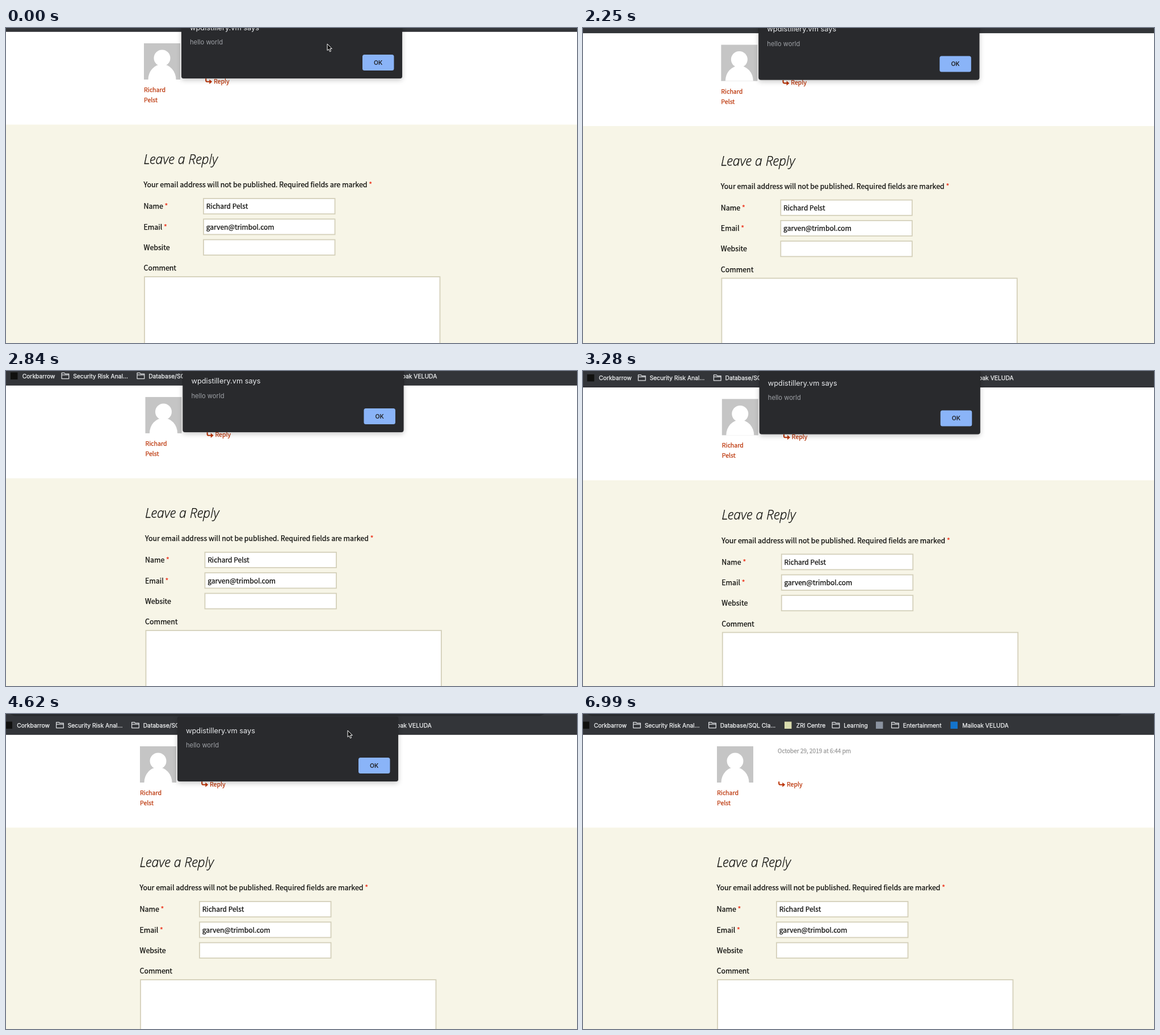
An HTML page that plays this animation: 1006 by 556 pixels, repeating every 8.19 s.

```html
<!DOCTYPE html>
<html lang="en">
<head>
<meta charset="utf-8">
<title>Leave a Reply</title>
<style>
  html, body { margin: 0; width: 100%; height: 100%; overflow: hidden; background: #fff; }
  #stage { position: relative; width: 1006px; height: 556px; overflow: hidden; background: #fff; }
  #view, #page, #cursor { position: absolute; left: 0; top: 0; }
  svg { display: block; overflow: visible; }
  #page {
    font: 12.41px "Noto Sans CJK JP", "Noto Sans CJK SC", "Noto Sans CJK", sans-serif;
    color: #0c0c0a;
  }
  #page text, #page tspan { fill: currentColor; stroke: currentColor; stroke-width: .25px; }
  #page .ui { font: 10.3px Inter, Roboto, sans-serif; color: #f1f3f4; }
  #page .title { font: italic 300 23px "Open Sans", "Noto Sans", sans-serif; }
  #page .link { font-size: 10.6px; color: #bc360a; }
  #page .date { font-size: 10px; color: #999; }
  #page .input { font-size: 12.1px; }
  #page .req { color: #ed331c; }
  .box { fill: #fff; stroke: #d4d0ba; stroke-width: 1.8; }
  .folder { fill: none; stroke: #dfe1e4; stroke-width: 1.25; stroke-linejoin: round; }
  #dialog {
    position: absolute; left: 302px; top: 5px; width: 388.5px; height: 114px;
    border-radius: 4px; background: #292a2d; transform-origin: 50% 100%;
    font-family: Inter, Roboto, sans-serif;
  }
  #dialog.open { box-shadow: 0 3px 10px rgba(0,0,0,.22), 0 0 1px rgba(0,0,0,.5); }
  #dialog.closing {
    opacity: .085;
    transform: translateY(-17px) matrix3d(1,0,0,0, 0,1.05,0,-.0006, 0,0,1,0, 0,0,0,1);
  }
  #dialog.closed { display: none; }
</style>
</head>
<body>
<div id="stage">
  <div id="view">
    <svg id="page" width="1006" height="556">
      <rect x="-20" y="200.5" width="1060" height="420" fill="#f7f5e7"/>

      <rect x="-20" y="-10" width="1060" height="46.5" fill="#333539"/>
      <rect x="-20" y="35.5" width="1060" height="1" fill="#2a2b2e"/>
      <rect x="3" y="-24" width="950" height="27.5" rx="14" fill="#282a2d"/>
      <g id="marks"></g>

      <rect x="236" y="57" width="64" height="64" fill="#c5c5c5"/>
      <circle cx="268" cy="83" r="14.5" fill="#fff"/>
      <path d="M243.500 121A24.5 27 0 0 1 292.5 121Z" fill="#fff"/>
      <text class="link" x="236" y="143">Richard</text>
      <text class="link" x="236" y="161">Pelst</text>
      <text class="date" x="343" y="69.3">October 29, 2019 at 6:44 pm</text>
      <path d="M345.2 119.3v3.2q0 2.3 2.4 2.3h4.8" fill="none" stroke="#bc360a" stroke-width="2.1"/>
      <path d="M351.3 120.7L356.2 124.8L351.3 129Z" fill="#bc360a"/>
      <text class="link" x="359" y="127.5">Reply</text>

      <text class="title" x="235.5" y="270">Leave a Reply</text>
      <text x="235.5" y="311.4">Your email address will not be published. Required fields are marked <tspan class="req">*</tspan></text>
      <g id="form"></g>
      <text x="235.5" y="458.4">Comment</text>
      <rect class="box" x="237" y="469.1" width="520.5" height="200"/>
    </svg>

    <div id="dialog" class="open">
      <svg width="388" height="114">
        <text x="15" y="28.5" font-size="12.8" fill="#e8eaed">wpdistillery.vm says</text>
        <text x="15" y="54" font-size="11.2" fill="#9fa2a7">hello world</text>
        <rect x="319" y="72" width="55.5" height="28" rx="3.5" fill="#8ab4f8"/>
        <text x="346.7" y="89.7" font-size="10.4" font-weight="600" text-anchor="middle" fill="#202124">OK</text>
      </svg>
    </div>
  </div>

  <svg id="cursor" width="12" height="18">
    <path d="M0 0V11.6L2.6 9.3L4.5 13.7L6.5 12.9L4.7 8.6H8.3Z" fill="#0b0b0b" stroke="#fff" stroke-width="1"/>
  </svg>
</div>

<script>
const $ = id => document.getElementById(id);
const LOOP = 8190;
const STEP = 148;

// Bookmarks: icon x, label, icon colour (none = folder)
const marks = [
  [-1.5, 'Corkbarrow', '#11110f'],
  [88, 'Security Risk Anal...'],
  [221, 'Database/SQL Cla...'],
  [355, 'ZRI Centre', '#d9dcae'],
  [438.5, 'Learning'],
  [516, '', '#8b93a0'],
  [543, 'Entertainment'],
  [647.5, 'Mailoak VELUDA', '#1474cc']
];
const icon = color => color
  ? `<rect y="13.5" width="12.5" height="12.5" fill="${color}"/>`
  : '<path class="folder" d="M.6 24.6V14.5H5.300L6.8 16.200H13.3V24.6ZM.6 18H13.3"/>';
$('marks').innerHTML = marks.map(([x, label, color]) =>
  `<g transform="translate(${x})">${icon(color)}<text class="ui" x="20.7" y="23.7">${label}</text></g>`
).join('');

const fields = [['Name', 'Richard Pelst'], ['Email', 'garven@trimbol.com'], ['Website', '']];
$('form').innerHTML = fields.map(([label, value], i) => {
  const y = 349.3 + i * 36.3;
  const star = value && ' <tspan class="req">*</tspan>';
  return `<text x="235.5" y="${y}">${label}${star}</text>
    <rect class="box" x="341" y="${y - 18.3}" width="231.5" height="27.2"/>
    <text class="input" x="345.7" y="${y}">${value}</text>`;
}).join('');

const linear = u => u;
const soft = u => (u + u * u * (3 - 2 * u)) / 2;
const slowStart = u => u ** 1.4;

// Each move starts at a time and reaches its end point in a few held steps
const pan = {
  from: [7, -30],
  moves: [
    { start: 2250, steps: 6, to: [9.8, -8.5], ease: soft },
    { start: 3280, steps: 5, to: [0, 0], ease: slowStart }
  ]
};
const hover = { from: [566, 28], moves: [] };
const pointer = {
  from: [602, 29],
  moves: [
    { start: 4760, steps: 3, to: [643.5, 87.5], ease: soft },
    { start: 6110, steps: 2, to: [750, 471], ease: linear },
    { start: 6550, steps: 3, to: [902, 545], ease: linear }
  ]
};

function position({ from, moves }, t) {
  let p = from;
  for (const { start, steps, to, ease } of moves) {
    if (t < start) break;
    const k = Math.floor((t - start + 8) / STEP) + 1;
    const u = ease(Math.min(1, k / steps));
    p = p.map((v, i) => v + (to[i] - v) * u);
  }
  return p;
}

function place(el, [x, y]) {
  el.style.transform = `translate(${x}px, ${y}px)`;
}

function draw(ms) {
  const t = ms % LOOP;
  const early = t < 150;
  const shown = early || (t >= 4620 && t < 6990);
  place($('view'), position(pan, t));
  place($('cursor'), position(early ? hover : pointer, t));
  $('cursor').style.display = shown ? 'block' : 'none';
  $('dialog').className = t < 5360 ? 'open' : t < 5510 ? 'closing' : 'closed';
}

let start;
function tick(now) {
  start ??= now;
  draw(Math.max(0, now - start));
  requestAnimationFrame(tick);
}
draw(0);
requestAnimationFrame(tick);
</script>
</body>
</html>
```
